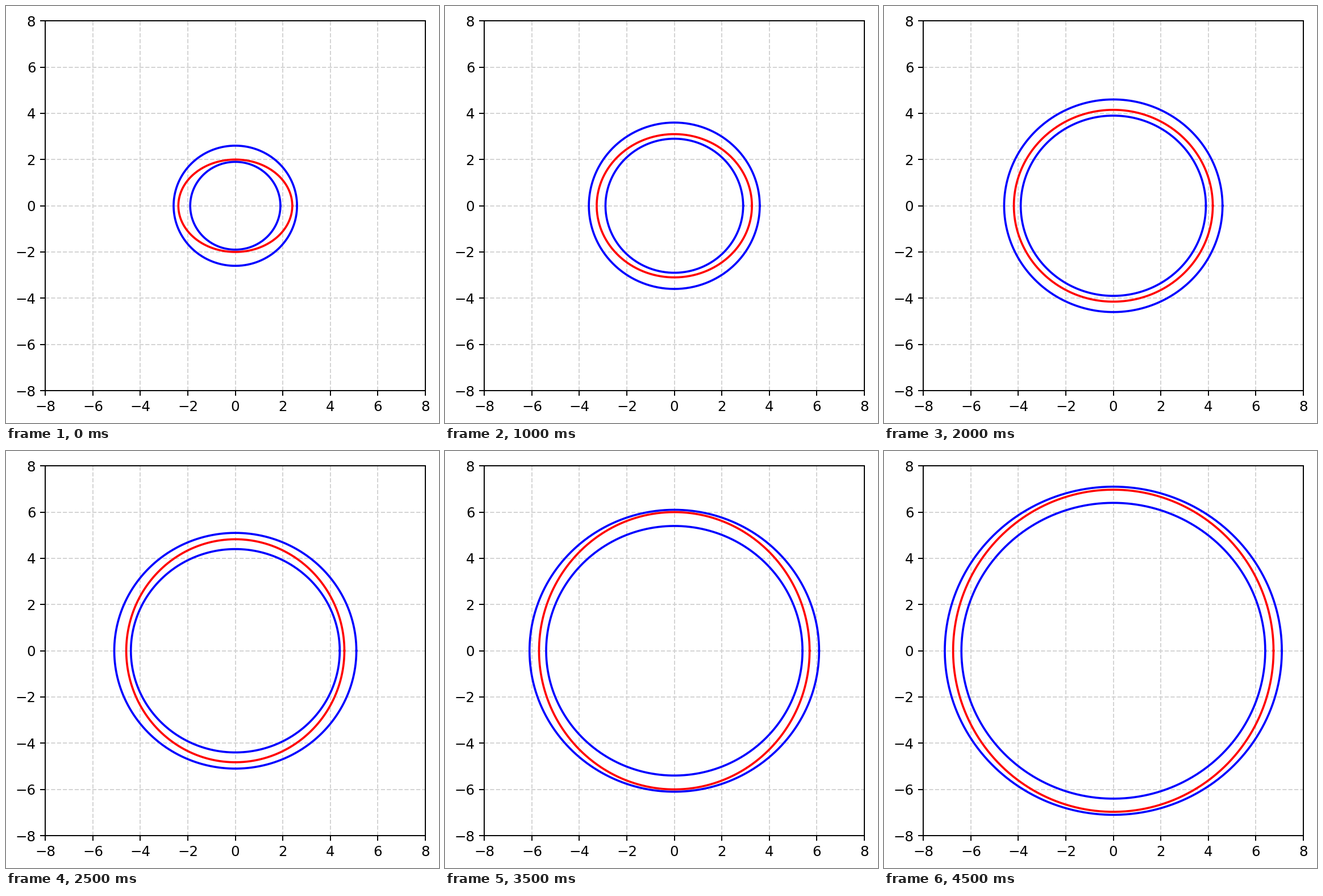
Animation of 762 by 734 pixels, one loop 7.5 s. Source, as a matplotlib script:

```python
import numpy as np
import matplotlib.pyplot as plt
from matplotlib.animation import FuncAnimation

W, H, DPI = 762, 734, 176
STEPS, FRAMES, INTERVAL = 10, 15, 500
EPS = 1e-6  # keeps the pixel size from being truncated one short

plt.rcParams["font.family"] = "DejaVu Sans"
fig = plt.figure(figsize=((W + EPS) / DPI, (H + EPS) / DPI), dpi=DPI,
                 facecolor="white")
ax = fig.add_axes([69.4 / W, 57 / H, 668.3 / W, 650.8 / H])
ax.set(xlim=(-8, 8), ylim=(-8, 8))
ax.set_xticks(range(-8, 9, 2))
ax.set_yticks(range(-8, 9, 2))
ax.grid(color="lightgray", linestyle="--", linewidth=0.8)

# Semi-axes of the ellipse, measured outwards from the inner circle
KEYS = [0, 2, 4, 6, 7, 8, 9]
GAP_X = [0.5, 0.37, 0.29, 0.1, 0.3, 0.26, 0.35]
GAP_Y = [0.1, 0.2, 0.25, 0.6, 0.6, 0.6, 0.57]

theta = np.linspace(0, 2 * np.pi, 400)
inner, = ax.plot([], [], color="blue", lw=1.5)
outer, = ax.plot([], [], color="blue", lw=1.5)
ellipse, = ax.plot([], [], color="red", lw=1.5)


def set_ellipse(line, a, b):
    line.set_data(a * np.cos(theta), b * np.sin(theta))


def update(frame):
    step = min(frame, STEPS - 1)  # hold the last pose
    r = 1.9 + 0.5 * step
    set_ellipse(inner, r, r)
    set_ellipse(outer, r + 0.7, r + 0.7)
    set_ellipse(ellipse, r + np.interp(step, KEYS, GAP_X),
                r + np.interp(step, KEYS, GAP_Y))
    return inner, outer, ellipse


anim = FuncAnimation(fig, update, frames=FRAMES, interval=INTERVAL,
                     repeat=True, repeat_delay=0, blit=False)
plt.show()
```
